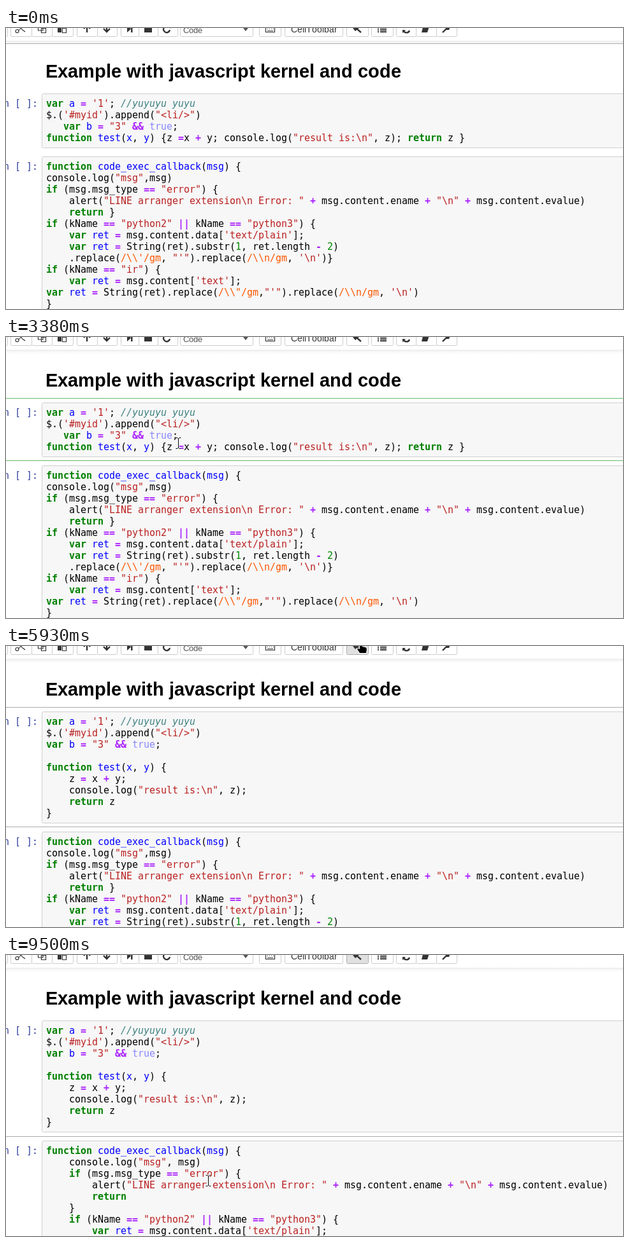
These frames come from a looping animation (968 by 442 pixels, 9540 ms). An HTML page with a canvas:

```html
<!DOCTYPE html>
<html lang="en">
<head>
<meta charset="utf-8">
<title>Notebook code formatter</title>
<style>
html, body { margin: 0; width: 100%; height: 100%; overflow: hidden; background: #fff; }
canvas { display: block; }
</style>
</head>
<body>
<canvas id="stage" width="968" height="442"></canvas>
<script>
const ctx = document.getElementById('stage').getContext('2d');
const W = 968, H = 442, LOOP = 9540;
const CHAR = 9, LINE = 18, CODE_X = 63;
const MONO = '15px "DejaVu Sans Mono", monospace';
const SANS = '"Liberation Sans", Arial, sans-serif';
const HEADING = 'Example with javascript kernel and code';
const HEADING_FONT = 'bold 29px ' + SANS, HEADING_X = 62;
const GRAY = '#ababab', GREEN = '#66bb6a';

const lines = text => text.split('\n').slice(1, -1);

const test = {
  raw: lines(String.raw`
var a = '1'; //yuyuyu yuyu
$.('#myid').append("<li/>")
   var b = "3" && true;
function test(x, y) {z =x + y; console.log("result is:\n", z); return z }
`),
  tidy: lines(String.raw`
var a = '1'; //yuyuyu yuyu
$.('#myid').append("<li/>")
var b = "3" && true;

function test(x, y) {
    z = x + y;
    console.log("result is:\n", z);
    return z
}
`)
};

const callback = {
  raw: lines(String.raw`
function code_exec_callback(msg) {
console.log("msg",msg)
if (msg.msg_type == "error") {
    alert("LINE arranger extension\n Error: " + msg.content.ename + "\n" + msg.content.evalue)
    return }
if (kName == "python2" || kName == "python3") {
    var ret = msg.content.data['text/plain'];
    var ret = String(ret).substr(1, ret.length - 2)
    .replace(/\\'/gm, "'").replace(/\\n/gm, '\n')}
if (kName == "ir") {
    var ret = msg.content['text'];
var ret = String(ret).replace(/\\"/gm,"'").replace(/\\n/gm, '\n')
}
`),
  tidy: lines(String.raw`
function code_exec_callback(msg) {
    console.log("msg", msg)
    if (msg.msg_type == "error") {
        alert("LINE arranger extension\n Error: " + msg.content.ename + "\n" + msg.content.evalue)
        return
    }
    if (kName == "python2" || kName == "python3") {
        var ret = msg.content.data['text/plain'];
        var ret = String(ret).substr(1, ret.length - 2)
`)
};

const TOKEN = new RegExp([
  String.raw`(?<comment>\/\/.*)`,
  String.raw`(?<regex>\/\\\\.\/gm)`,
  `(?<string>"[^"]*"|'[^']*')`,
  String.raw`(?<keyword>\b(?:var|function|if|return)\b)`,
  String.raw`(?<def>(?<=var |function |function \w+\([^)]*)\w+)`,
  String.raw`(?<atom>\btrue\b)`,
  String.raw`(?<number>\b\d+\b)`,
  '(?<operator>[=&|+-]+)',
  String.raw`(?<plain>\w+|.)`
].join('|'), 'g');

const STYLE = {
  comment: ['#408080', 'italic '], regex: ['#ff5500', ''], string: ['#ba2121', ''],
  keyword: ['#008000', 'bold '], def: ['#0000ff', ''], atom: ['#8888ff', ''],
  number: ['#008800', ''], operator: ['#aa22ff', 'bold '], plain: ['#000', '']
};

// Letters sit on whole pixels, as in hinted screen text.
const advance = c => Math.round(ctx.measureText(c).width);

function pixelText(text, x, y) {
  for (const c of text) {
    ctx.fillText(c, x, y);
    x += advance(c);
  }
}

function monoText(text, x, y, color, weight = '') {
  ctx.fillStyle = color;
  ctx.font = weight + MONO;
  pixelText(text, x, y);
}

function codeLine(text, y) {
  for (const m of text.matchAll(TOKEN)) {
    const kind = Object.keys(m.groups).find(k => m.groups[k] !== undefined);
    monoText(m[0], CODE_X + m.index * CHAR, y, ...STYLE[kind]);
  }
}

function box(x, y, w, h, fill, border, r = 2) {
  ctx.beginPath();
  ctx.roundRect(x + .5, y + .5, w - 1, h - 1, r);
  ctx.fillStyle = fill;
  ctx.fill();
  ctx.strokeStyle = border;
  ctx.lineWidth = 1;
  ctx.stroke();
}

function rule(y, color) {
  ctx.fillStyle = color;
  ctx.fillRect(0, y, W, 1);
}

function codeCell(code, top) {
  box(56, top, 960, code.length * LINE + 14, '#f7f7f7', '#cfcfcf');
  monoText('In [ ]:', -13, top + 21, '#303f9f');
  code.forEach((text, i) => {
    const y = top + 21 + i * LINE;
    if (y < H + 12) codeLine(text, y);
  });
}

// Toolbar: each group lists the edges of its buttons.
const GROUPS = [[-30, 2], [7, 40, 72, 105], [111, 143, 174], [180, 208, 238, 269],
  [397, 431], [437, 528], [534, 568], [573, 607], [612, 643, 675, 707]];
const FORMAT_BUTTON = 534;

const ICON_LINES = new Path2D(
  'M19 4L31-4M18-3L30 6M20 5a2.5 2.5 0 1 1-5 0a2.5 2.5 0 1 1 5 0' +
  'M50.5-4H58V4H50.5ZM55.5.5H62.5V7.5H55.5Z' +
  'M88.5.5H94.5V7.5H88.5Z' +
  'M407.5-3.5H421.5V6.5H407.5ZM410 4.5H419M410 1.5H411M413 1.5H414M416 1.5H417M419 1.5H420');
const ICON_BOLD = new Path2D(
  'M127 7V-3M122 1L127-4L132 1M158-6V6M153 1L158 6L163 1' +
  'M257 3A5 5 0 1 1 255-2M549 0L557 7' +
  'M633 4A5 5 0 0 1 624 5M623 0A5 5 0 0 1 632-1M685 7L692 0');
const ICON_FILL = new Path2D(
  'M81-5H91V0H87V7H81ZM190-5L196 1.5L190 7ZM196-5H198.5V7H196Z' +
  'M217-5H229V7H217ZM254-4H259V1Z' +
  'M544 0L550-5L554 0L548 5Z' +
  'M583-1H585V1H583ZM587-1H597V1H587ZM583 2H585V4H583ZM587 2H597V4H587ZM583 5H585V7H583ZM587 5H597V7H587Z' +
  'M622 3V8L627 3ZM634-5V0H629Z' +
  'M655-5H665L661 7H652ZM690-3L694-5L693-1L697-2L695 3L690 3Z');

function toolbar(hover, formatFocused, cellType) {
  const shade = ctx.createLinearGradient(0, 20, 0, 27);
  shade.addColorStop(0, 'rgba(87,87,87,.12)');
  shade.addColorStop(.5, 'rgba(87,87,87,.04)');
  shade.addColorStop(1, 'rgba(87,87,87,0)');
  ctx.fillStyle = shade;
  ctx.fillRect(0, 20, W, 7);

  for (const edges of GROUPS) {
    for (let i = 0; i + 1 < edges.length; i++) {
      const x = edges[i];
      const on = hover === x || (formatFocused && x === FORMAT_BUTTON);
      box(x, -10, edges[i + 1] - x + 1, 24, on ? '#e0e0e0' : '#fff', on ? '#adadad' : '#ccc');
    }
  }
  box(273, -10, 115, 24, '#fff', '#ccc');
  ctx.fillStyle = '#555';
  ctx.font = '13px ' + SANS;
  pixelText(cellType, 278, 8);
  ctx.fill(new Path2D('M372 0H380L376 5Z'));
  ctx.fillStyle = ctx.strokeStyle = '#333';
  ctx.font = '14px ' + SANS;
  pixelText('CellToolbar', 447, 7);
  ctx.lineWidth = 1.2;
  ctx.stroke(ICON_LINES);
  ctx.lineWidth = 2.4;
  ctx.stroke(ICON_BOLD);
  ctx.fill(ICON_FILL);
}

function heading(selectedTo) {
  ctx.font = HEADING_FONT;
  ctx.fillStyle = '#000';
  pixelText(HEADING, HEADING_X, 78);

  // Snap the selection to the nearest gap between letters.
  let end = HEADING_X;
  for (const c of HEADING) {
    const w = advance(c);
    if (end + w / 2 > selectedTo) break;
    end += w;
  }
  if (end === HEADING_X) return;
  ctx.save();
  ctx.beginPath();
  ctx.rect(HEADING_X, 52, end - HEADING_X, 32);
  ctx.clip();
  ctx.fillStyle = '#718bd0';
  ctx.fillRect(0, 52, W, 32);
  ctx.fillStyle = '#fff';
  pixelText(HEADING, HEADING_X, 78);
  ctx.restore();
}

// Pointer route as time, x, y.
const ROUTE = [
  [720, 652, 168], [1000, 300, 90], [1220, 90, 52], [1360, 62, 66], [1670, 62, 66],
  [2200, 455, 77], [2570, 652, 85], [2940, 652, 85], [3180, 270, 167], [3460, 270, 167],
  [4300, 230, 400], [4340, 230, 398], [4540, 337, 123], [4700, 337, 123], [5270, 585, 29],
  [5400, 575, 8], [5590, 557, -4], [6230, 557, -4], [6700, 200, 150], [7160, 65, 287],
  [8000, 203, 398], [8170, 203, 398], [8370, 527, 2], [8500, 645, 8], [8730, 552, 0],
  [8870, 552, 0], [9110, 645, 19], [9300, 645, 19], [9500, 317, 355]
];

function pointerAt(t) {
  const next = ROUTE.findIndex(p => p[0] > t);
  if (next < 0) return ROUTE.at(-1).slice(1);
  if (next === 0) return ROUTE[0].slice(1);
  const [t0, x0, y0] = ROUTE[next - 1], [t1, x1, y1] = ROUTE[next];
  const k = (t - t0) / (t1 - t0);
  return [Math.round(x0 + (x1 - x0) * k), Math.round(y0 + (y1 - y0) * k)];
}

function buttonAt(x, y) {
  if (y > 13) return null;
  for (const edges of GROUPS) {
    if (x >= edges[0] && x <= edges.at(-1)) return edges.findLast(e => e <= x);
  }
  return null;
}

const IBEAM = new Path2D('M-3.5-8.5H-1L.5-7L2-8.5H4.5M.5-7V7M-3.5 8.5H-1L.5 7L2 8.5H4.5');
const HAND = new Path2D('M-2 1Q0-1 2 1V5L7 6Q9 7 9 9L8 15H-2L-6 9Q-5 7-2 9Z');
const ARROW = new Path2D('M0 0V15L4 11L7 17L9 16L6 10H11Z');

function pointer(x, y, overButton, secondTop) {
  const overHeading = x > 56 && x < 622 && y > 50 && y < 86;
  const overCode = x > 56 && (y > 102 && y < secondTop - 13 || y > secondTop);
  ctx.save();
  ctx.translate(x, y);
  ctx.strokeStyle = '#fff';
  if (!overButton && (overHeading || overCode)) {
    ctx.lineWidth = 2.6;
    ctx.stroke(IBEAM);
    ctx.strokeStyle = '#000';
    ctx.lineWidth = 1;
    ctx.stroke(IBEAM);
  } else {
    const shape = overButton ? HAND : ARROW;
    ctx.lineWidth = 2;
    ctx.stroke(shape);
    ctx.fillStyle = '#000';
    ctx.fill(shape);
  }
  ctx.restore();
}

function selectionRules(t, secondTop) {
  const first = 96, second = secondTop - 7;
  if (t < 2940) rule(24, GRAY);
  else if (t < 3380) { rule(25, GRAY); rule(95, GRAY); }
  else if (t < 4300) { rule(first, GREEN); rule(second - 1, GREEN); }
  else if (t < 4700) rule(second, '#808080');
  else if (t < 8000) {
    const color = t < 5740 ? GREEN : GRAY;
    rule(first, color);
    rule(second - 1, color);
  }
  else rule(second, t < 8870 ? '#7d957d' : GRAY);
}

function draw(t) {
  const firstCode = t < 5850 ? test.raw : test.tidy;
  const secondCode = t < 8990 ? callback.raw : callback.tidy;
  const secondTop = 103 + firstCode.length * LINE + 27;
  const [x, y] = pointerAt(t);
  const hover = t < 720 ? null : buttonAt(x, y);
  const formatFocused = t >= 5740 && t < 8000 || t >= 8870;

  ctx.fillStyle = '#fff';
  ctx.fillRect(0, 0, W, H);
  toolbar(hover, formatFocused, t >= 2940 && t < 3380 ? 'Markdown' : 'Code');
  heading(t >= 1670 && t < 3380 ? pointerAt(t - 72)[0] : 0);
  selectionRules(t, secondTop);
  codeCell(firstCode, 103);
  codeCell(secondCode, secondTop);
  if (t >= 8000 && t < 8870) {
    ctx.fillStyle = '#000';
    ctx.fillRect(198, 389, 1, LINE);
  }
  if (t >= 720) pointer(x, y, hover !== null, secondTop);
}

const start = performance.now();
function tick() {
  draw((performance.now() - start) % LOOP);
  requestAnimationFrame(tick);
}
tick();
</script>
</body>
</html>
```
